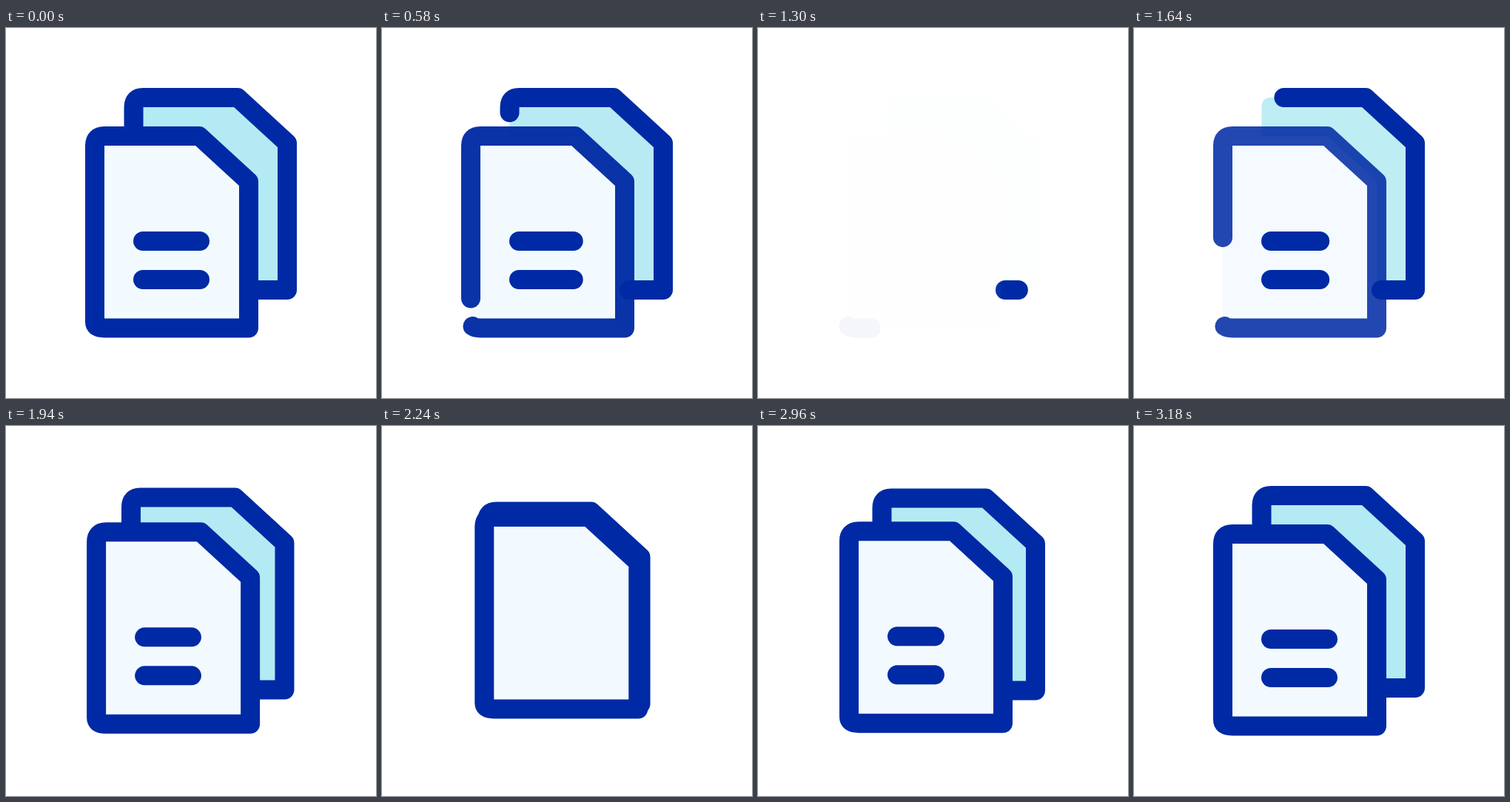
An HTML page that plays this animation: 500x500 px, repeating every 4 s.

```html
<!DOCTYPE html>
<html lang="en">
<head>
<meta charset="utf-8">
<title>Copy documents</title>
<style>
  html, body { margin: 0; width: 100%; height: 100%; overflow: hidden; background: #fff; }
  svg { display: block; width: 100vw; height: 100vh; }
  .ink { fill: none; stroke: #002aa5; stroke-width: 26; stroke-linecap: round; stroke-linejoin: round; }
</style>
</head>
<body>
<svg viewBox="0 0 500 500">
  <g id="back">
    <path id="backFill" fill="#b4eaf3" d="M172.5 146V107Q172.5 94 185 94H313L380 155.5V354H328V207.5L261 146Z"/>
    <path id="backLine" class="ink" pathLength="1" d="M334 354H380V155.5L313 94H185Q172.5 94 172.5 107V139"/>
  </g>
  <g id="front">
    <g id="sheet">
      <path fill="#f3faff" d="M133 405.5H328V207.5L261 146H133Q120 146 120 159V397Q120 405.5 133 405.5Z"/>
      <path id="frontLine" class="ink" pathLength="1" d="M122.500 403Q126 405.500 133 405.500H328V207.500L261 146H133Q120 146 120 159V397Q120 401 122.500 403"/>
    </g>
    <path id="row1" class="ink" pathLength="1" d="M185 288H262"/>
    <path id="row2" class="ink" pathLength="1" d="M185 340H262"/>
  </g>
</svg>
<script>
const LOOP = 4000, STEP = 20;
const el = id => document.getElementById(id);
const [back, backFill, backLine, front, sheet, frontLine, row1, row2] =
  ['back', 'backFill', 'backLine', 'front', 'sheet', 'frontLine', 'row1', 'row2'].map(el);

const smooth = u => u * u * (3 - 2 * u);
const easeIn = u => u ** 1.46;
const easeOut = u => 1 - (1 - u) ** 1.85;

// Each row: start, end, value reached, easing; every track begins at `first`.
const tracks = {
  back:  { first: 1, rows: [[520, 1000, 0, easeIn], [1290, 1820, 1, easeOut]] },
  front: { first: 1, rows: [[520, 1000, 0, smooth], [1290, 1820, 1, easeOut]] },
  rows:  { first: 1, rows: [[520, 1000, 0, smooth], [1300, 1820, 1, easeOut],
                            [1840, 2220, 0, smooth], [2680, 3140, 1, smooth]] },
  merge: { first: 0, rows: [[1840, 2340, 1, smooth], [2600, 3075, 0, smooth]] }
};

function valueAt({ first, rows }, t) {
  let v = first;
  for (const [start, end, to, ease] of rows) {
    if (t <= start) break;
    v += (to - v) * ease(Math.min(1, (t - start) / (end - start)));
  }
  return v;
}

function trim(path, p) {
  path.style.visibility = p > 0.001 ? 'visible' : 'hidden';
  path.setAttribute('stroke-dasharray', p > 0.999 ? 'none' : `${p} 2`);
}

function shift(group, x, y) {
  group.setAttribute('transform', `translate(${x} ${y})`);
}

function draw(t) {
  const f = valueAt(tracks.front, t);
  const r = valueAt(tracks.rows, t);
  const m = valueAt(tracks.merge, t);
  trim(backLine, valueAt(tracks.back, t));
  trim(frontLine, f);
  trim(row1, r);
  trim(row2, r);
  backFill.setAttribute('opacity', f);
  sheet.setAttribute('opacity', f);
  shift(back, -34 * m, 24 * m);
  shift(front, 20.4 * m, -25.7 * m);
}

const origin = performance.now();
function tick() {
  const t = (performance.now() - origin) % LOOP;
  draw(Math.floor(t / STEP) * STEP);
  requestAnimationFrame(tick);
}
draw(0);
requestAnimationFrame(tick);
</script>
</body>
</html>
```
